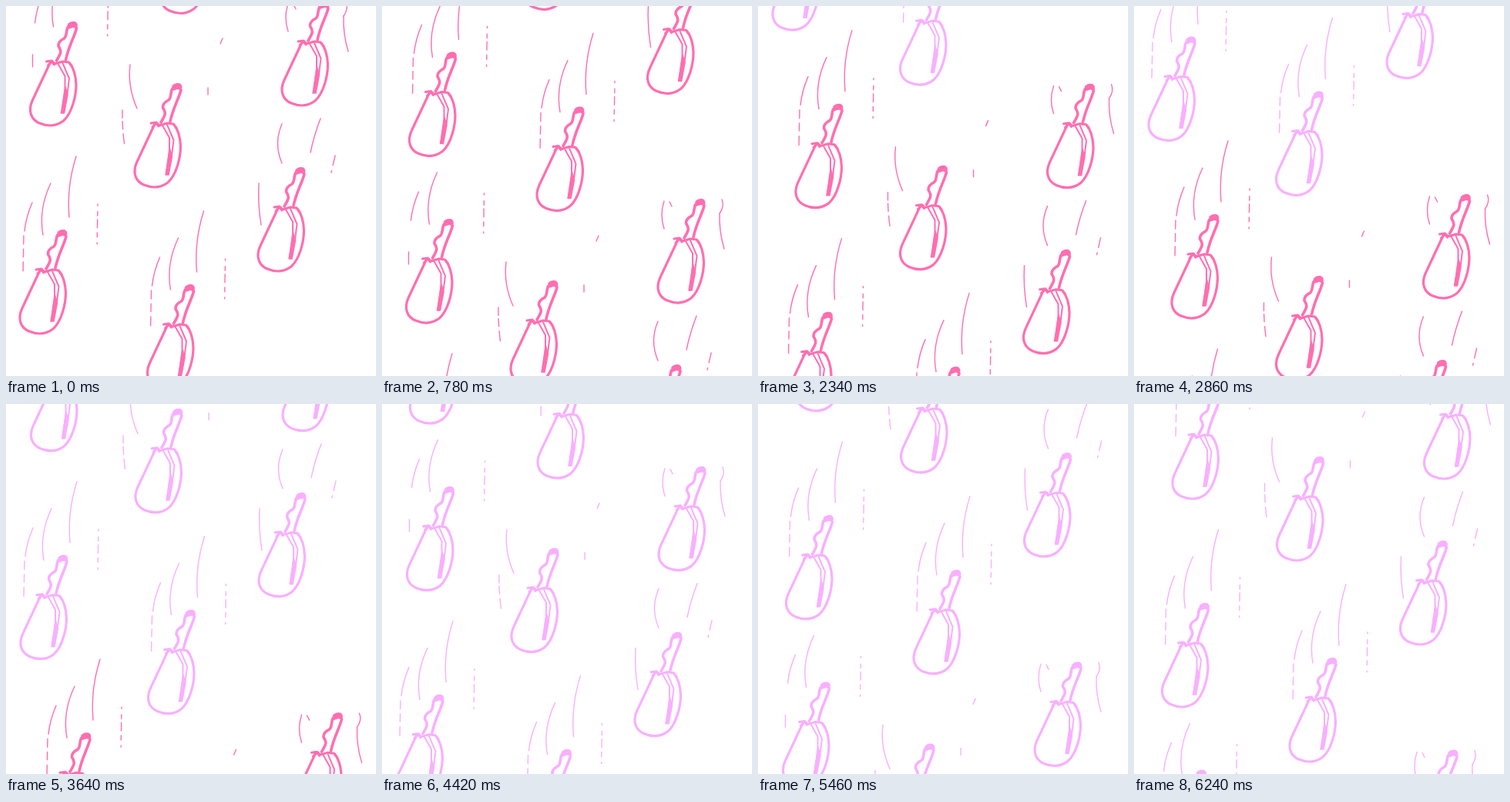
These frames come from a looping animation (480 px wide and 480 px high, 6500 ms). An HTML page with a canvas:

```html
<!DOCTYPE html>
<html lang="en">
<head>
<meta charset="utf-8">
<title>Falling aubergines</title>
<style>
html, body { margin: 0; width: 100%; height: 100%; overflow: hidden; background: #fff; }
canvas { display: block; width: 480px; height: 480px; }
</style>
</head>
<body>
<canvas id="stage" width="480" height="480"></canvas>
<script>
const ctx = document.getElementById('stage').getContext('2d');
const HOLD = 260, FRAMES = 25, PUSH = 8;
const SCREEN = 480.5, START = 25;
const TILE = { x: 1, y: -987 }, ROW = { x: 17.5, y: -486.5 };

let seed = 7;
function random(min, max) {
  seed = (seed * 16807) % 2147483647;
  return min + (max - min) * seed / 2147483647;
}

// Motion line: a shallow arc, solid or broken by random gaps
function streak(x, y, dx, dy, bend = 0, broken = false) {
  const path = new Path2D();
  path.moveTo(x, y);
  path.quadraticCurveTo(x + dx / 2 + bend, y + dy / 2, x + dx, y + dy);
  const dash = [];
  for (let i = 0; broken && i < 4; i++) dash.push(random(2, 14), random(4, 8));
  return { path, dash };
}

const sweep = [
  streak(-15, -65, -10, 67, -11),
  streak(-39, -40, -10, 37, -3),
  streak(46, -38, -1, 58, 0, true)
];
const marks = {
  short: [...sweep, streak(-52, 38, 0, 16)],
  full: [...sweep, streak(18, -100, -9, 79, -8), streak(-50, 3, -1, 50, 0, true)],
  bent: [
    streak(-61, -29, 9, 57, -8),
    streak(-71, 30, 3, 47, -2, true),
    streak(40, 1, 0, 9),
    streak(59, -63, -3, 7)
  ],
  wave: [
    streak(-47, -2, 0, 36, -6),
    streak(-40, -1, 3, 6),
    streak(28, -4, -3, 18, 5),
    streak(25, 14, 6, 46, -4)
  ],
  arms: [
    streak(-24, -61, 0, 51, -11),
    streak(26, -68, -13, 44, -2),
    streak(-54, 16, 3, 54, -3),
    streak(45, -20, -5, 22, 0, true)
  ]
};

// Drawn around the tip of the stalk
const body = new Path2D('M-29 48L-52 97C-59 112 -53 123 -43 127C-31 132 -20 130 -12 124C-1 114 4.5 92 4.5 77C4 63 0 54 -4 49');
const stalk = new Path2D('M-6 2C-9 6 -7 14 -11 17Q-19 21 -18.5 27C-14 34 -15 36 -21 46M5 4C2 16 -5 26 -9 45');
const tip = new Path2D('M-6 -1Q-3 -5 3 -4Q7 -2 5 4L1 2L-5 4Z');
const collar = new Path2D('M-34 47L-27 46L-23 50L-13 47L-5 48L-1 53M-32 52L-27 47L-24 51');
const leaf = new Path2D('M-19 50L-10 66L-10 82L-14 113M-13 49L-4.5 69L-7 89L-13 113');
const spike = new Path2D('M-9.5 80L-6.5 90L-11 114L-15 114Z');

// Each plant: place, marks in the lower row, marks in the upper row
const plants = [
  [86.5, 0, 'short', 'full'], [222, 80, 'bent'], [413, -26, 'wave'],
  [382, 189, 'arms'], [73, 270, 'full'], [238.5, 341, 'full']
];

function stroke(path, width) {
  ctx.lineWidth = width;
  ctx.stroke(path);
}

function drawPlant(x, y, kind) {
  if (y < -140 || y > 600) return;
  ctx.save();
  ctx.translate(x, y);
  for (const m of marks[kind]) {
    ctx.setLineDash(m.dash);
    stroke(m.path, 1.4);
  }
  ctx.setLineDash([]);
  stroke(body, 3.2);
  stroke(stalk, 3.6);
  stroke(collar, 3);
  stroke(leaf, 2);
  for (const shape of [tip, spike]) {
    ctx.fill(shape);
    stroke(shape, 1.5);
  }
  ctx.restore();
}

function drawTile(x, y, color) {
  ctx.strokeStyle = ctx.fillStyle = color;
  for (const [px, py, low, high = low] of plants) {
    drawPlant(x + px, y + py, low);
    drawPlant(x + px + ROW.x, y + py + ROW.y, high);
  }
}

// Quick start, steady middle, soft end
const ease = u => u + 0.428 * u ** 0.6 * (1 - u) ** 0.87;

function draw(now) {
  const step = Math.floor(now / HOLD) % FRAMES;
  const push = Math.floor(step / PUSH);
  const y = START + SCREEN * (push + ease(step % PUSH / PUSH));
  ctx.fillStyle = '#fff';
  ctx.fillRect(0, 0, 480, 480);
  ctx.lineCap = ctx.lineJoin = 'round';
  drawTile(0, y, '#ff6eb0');
  drawTile(TILE.x, y + TILE.y, '#f8b0ff');
}

let begin;
function tick(now) {
  if (begin === undefined) begin = now;
  draw(Math.max(0, now - begin));
  requestAnimationFrame(tick);
}
draw(0);
requestAnimationFrame(tick);
</script>
</body>
</html>
```
